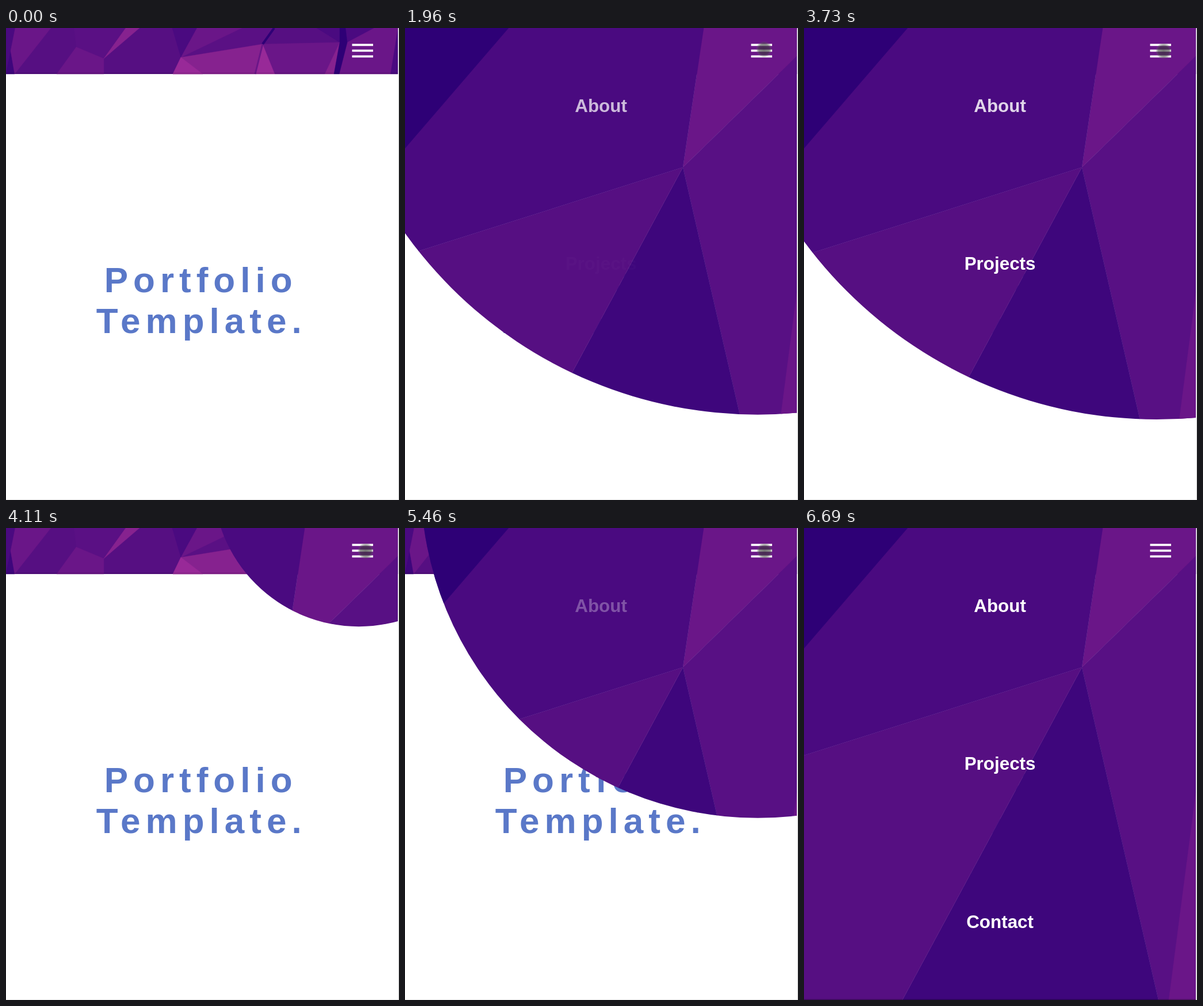
These frames come from a looping animation (683x820 px, 7090 ms). An HTML page:

```html
<!DOCTYPE html>
<html lang="en">
<head>
<meta charset="utf-8">
<title>Portfolio menu</title>
<style>
  html, body { margin: 0; width: 100%; height: 100%; overflow: hidden; background: #fff; }
  svg { display: block; width: 683px; height: 820px; }
  text { font-family: "Liberation Sans", Arial, sans-serif; font-weight: bold; }
  .title { font-size: 62px; letter-spacing: 9px; fill: #5a78c8; }
  .link { font-size: 31.4px; fill: #fff; text-anchor: middle; }
</style>
</head>
<body>
<svg viewBox="0 0 683 820">
  <defs>
    <clipPath id="reveal"><circle id="hole" cx="613" cy="-82"/></clipPath>
    <clipPath id="page"><rect width="681" height="820"/></clipPath>
    <radialGradient id="touch">
      <stop offset="0" stop-color="#333" stop-opacity=".68"/>
      <stop offset=".7" stop-color="#3c3c3c" stop-opacity=".58"/>
      <stop offset="1" stop-color="#666" stop-opacity=".18"/>
    </radialGradient>
  </defs>
  <rect width="683" height="820" fill="#fff"/>
  <rect y="819" width="683" height="1" fill="#e8e8e8"/>
  <rect x="682" width="1" height="820" fill="#cacaca"/>
  <rect width="681" height="80" fill="#560f82"/>
  <g id="header"></g>
  <rect y="77" width="681" height="3" opacity=".08"/>
  <text class="title" x="170.7" y="459">Portfolio</text>
  <text class="title" x="156.8" y="530">Template.</text>
  <rect id="caret" x="677" y="401" width="4" height="142" fill="#ffa500"/>
  <g clip-path="url(#page)">
    <g id="overlay" clip-path="url(#reveal)">
      <g id="menu"></g>
      <rect y="818.5" width="681" height="1.5" opacity=".3"/>
    </g>
  </g>
  <path d="M601.5 29.4h36.5m-36.5 10h36.5m-36.5 10h36.5" stroke="#fff" stroke-width="3.8"/>
  <rect id="tap" x="596" y="22" width="49" height="35" fill="#33b5e5" fill-opacity=".4"/>
  <circle id="cursor" r="13.5" fill="url(#touch)"/>
</svg>
<script>
const $ = id => document.getElementById(id);

function facet(parent, color, points) {
  parent.insertAdjacentHTML('beforeend',
    `<polygon points="${points.join(' ')}" fill="${color}" stroke="${color}" stroke-width=".4"/>`);
}

const dusk = '#2e0076', navy = '#3e067c', indigo = '#4a0a80', violet = '#5a1084',
  plum = '#6a1688', orchid = '#86228f', pink = '#982998';

// Menu: sectors around one hub, each reaching past the page edge, and two corners.
const hub = [483, 242];
const spokes = [[519, 0], [681, 49], [616, 820], [171, 820], [0, 395]];
const reach = p => p.map((v, i) => hub[i] + (v - hub[i]) * 9);
[plum, '#581084', navy, '#560f82', indigo].forEach((color, i) =>
  facet($('menu'), color, [hub, reach(spokes[i]), reach(spokes[(i + 1) % 5])]));
facet($('menu'), dusk, [[0, 0], [180, 0], [0, 209]]);
facet($('menu'), plum, [[681, 460], [634, 820], [681, 820]]);

// Header: a mesh over top-edge (t), middle (m) and bottom-edge (b) vertices.
const mesh = {
  t: [0, 16, 78, 118, 208, 232, 289, 332, 410, 466, 540, 580, 590, 640, 681].map(x => [x, 0]),
  m: [[8, 40], [122, 33], [170, 53], [304, 51], [446, 28], [580, 25], [593, 25]],
  b: [0, 15, 88, 170, 290, 342, 432, 467, 554, 570, 579, 668, 681].map(x => [x, 80])
};
const headerFacets = [
  [indigo, 't0 t1 m0 b0', 't6 t7 m3', 't10 t12 m5', 't12 t13 m6', 't14 b11 b12'],
  [navy, 'm0 b1 b0'],
  [violet, 't3 t4 m2 m1', 't8 t9 m4 m3'],
  [plum, 't1 t2 b1 m0', 'm1 m2 b3 b2', 't7 t8 m3', 'm4 m5 b8 b7', 't13 t14 b11 b10 m6'],
  [orchid, 't4 t5 m2', 'm3 m4 b6 b4', 'm5 b9 b8'],
  [pink, 'm3 b5 b4', 'm4 b7 b6'],
  [dusk, 't11 t12 m6 b10 b9 m5']
];
for (const [color, ...shapes] of headerFacets)
  for (const shape of shapes)
    facet($('header'), color, shape.split(' ').map(key => mesh[key[0]][key.slice(1)]));
$('header').insertAdjacentHTML('beforeend',
  `<path d="M466 0L446 28" stroke="${dusk}" stroke-width="4"/>
   <path d="M446 28L433 80" stroke="${plum}" stroke-width="3"/>`);

const links = ['About', 'Projects', 'Contact'].map((label, i) => {
  $('overlay').insertAdjacentHTML('beforeend',
    `<text class="link" x="340.6" y="${145.5 + 274.7 * i}">${label}</text>`);
  return $('overlay').lastElementChild;
});

const clamp = v => Math.min(1, Math.max(0, v));

function bezier(x1, y1, x2, y2) {
  const at = (a, b, u) => 3 * (1 - u) * (1 - u) * u * a + 3 * (1 - u) * u * u * b + u * u * u;
  return x => {
    x = clamp(x);
    if (x === 0 || x === 1) return x;
    let lo = 0, hi = 1;
    for (let i = 0; i < 24; i++) {
      const mid = (lo + hi) / 2;
      if (at(x1, x2, mid) < x) lo = mid; else hi = mid;
    }
    return at(y1, y2, lo);
  };
}
const easeOut = bezier(0, 0, .58, 1), ease = bezier(.25, .1, .25, 1);

const LOOP = 7090, ENTER = 200, LEAVE = 6690;
const BLINK = 782, BLINK_START = 1010;
const toggles = [1548, 3460, 5160];   // open, close, open

// Each toggle runs a full transition, alternating direction.
function openness(t, delay, duration, curve) {
  let value = 0;
  toggles.forEach((start, i) => {
    const p = curve((t - start - delay) / duration);
    if (p > 0) value = i % 2 ? 1 - p : p;
  });
  return value;
}

function cursorAt(t) {
  const ramp = (start, end) => clamp((t - start) / (end - start));
  const rise = ramp(ENTER, 720), settle = ramp(930, 1010), nudge = ramp(2400, 2500), exit = ramp(6230, 6600);
  return [
    621 + 3 * rise + nudge - 36 * exit * exit,
    698 - 612 * rise - 49 * settle + 3 * nudge + 742 * exit
  ];
}

const show = (id, on) => $(id).setAttribute('visibility', on ? 'visible' : 'hidden');

function draw(t) {
  $('hole').setAttribute('r', 50 + 1200 * openness(t, 0, 1000, easeOut));
  links.forEach((el, i) => el.setAttribute('opacity', openness(t, 200 * (i + 1), 500, ease)));
  show('caret', (t - BLINK_START + 2 * BLINK) % BLINK < 380);
  show('tap', toggles.some(start => t >= start && t < start + 150));
  show('cursor', t >= ENTER && t < LEAVE);
  const [x, y] = cursorAt(t);
  $('cursor').setAttribute('cx', x);
  $('cursor').setAttribute('cy', y);
}

const begin = performance.now();
function tick() {
  draw((performance.now() - begin) % LOOP);
  requestAnimationFrame(tick);
}
tick();
</script>
</body>
</html>
```
